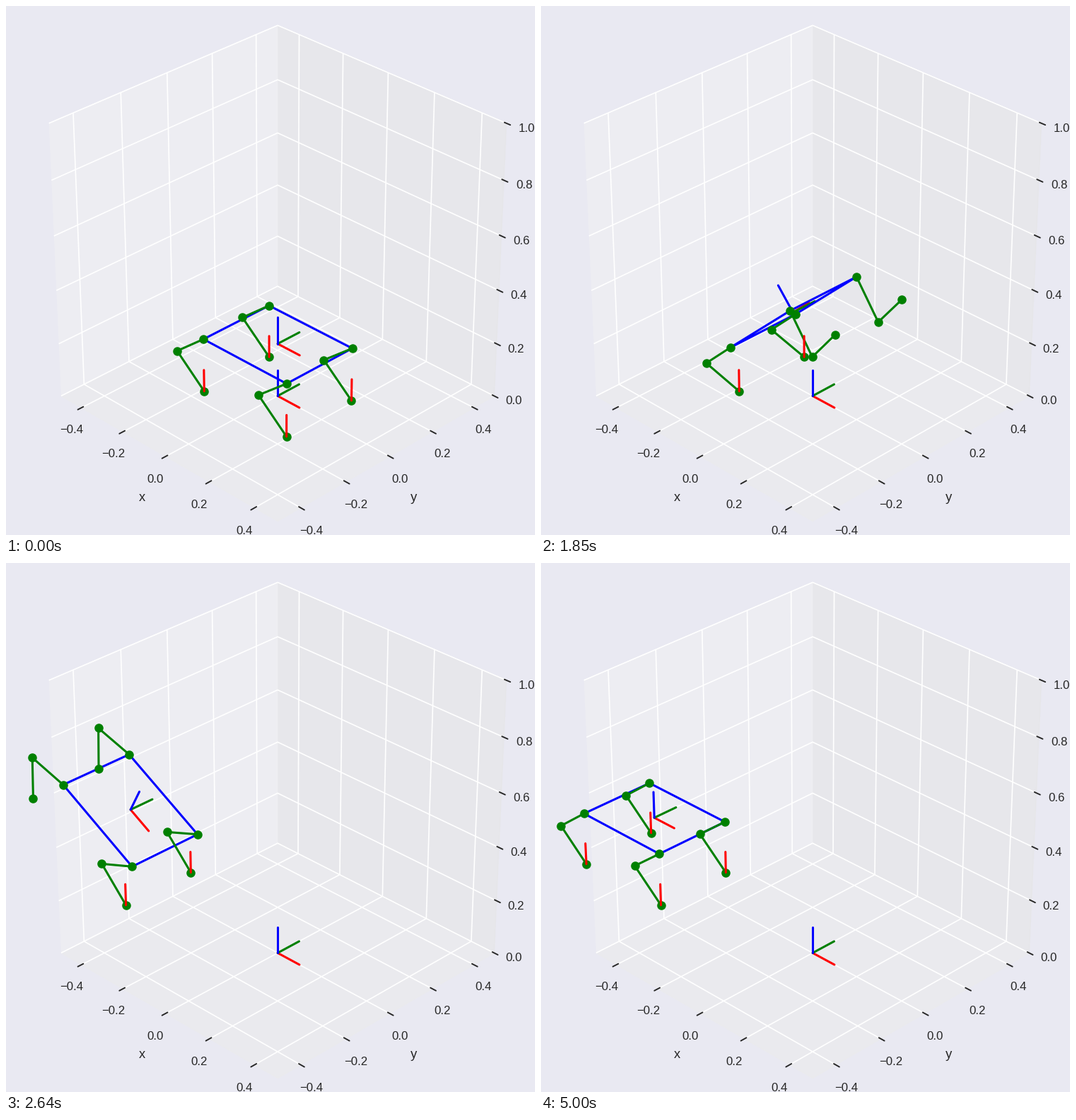
Recreate the animation shown at these times as a matplotlib script. Size 748 px wide and 748 px high, loop 5030 ms.

```python
import numpy as np
import matplotlib.pyplot as plt
from matplotlib.animation import FuncAnimation

INK = "#262626"
plt.rcParams.update({
    "font.family": "Liberation Sans",
    "figure.facecolor": "#E9E9F2", "axes.facecolor": "#E9E9F2",
    "text.color": INK, "axes.labelcolor": INK,
    "xtick.color": INK, "ytick.color": INK,
    "xtick.labelsize": 11, "ytick.labelsize": 11,
    "axes.labelsize": 12, "axes.labelpad": 6,
    "xtick.major.size": 6, "ytick.major.size": 6,
    "xtick.major.width": 1.25, "ytick.major.width": 1.25,
    "grid.color": "white", "grid.linewidth": 1.1, "grid.linestyle": "-",
    "lines.linewidth": 2, "lines.solid_capstyle": "round",
})

LOOP, FRAMES = 5030, 165
MID = 2203.5                      # the flip is symmetric in time about here
HALF_L, HALF_W = 0.19, 0.15       # hip offsets from the body centre
LINK, LEG, STAND = 0.1615, 0.2, 0.2
TRAVEL = 0.76
TOUCH, SETTLE = 0.2265, 0.70      # seconds from the middle of the flip
ARROW, AXIS = 0.082, 0.1


def smooth(a, b, v):
    u = np.clip((v - a) / (b - a), 0, 1)
    return u * u * (3 - 2 * u)


def hermite(knots, v):
    """Cubic through (time, value, slope) knots."""
    if v >= knots[-1][0]:
        return knots[-1][1]
    for (a, p, m), (b, q, n) in zip(knots, knots[1:]):
        if v <= b:
            d = b - a
            u = (v - a) / d
            return (p * (1 - 3*u*u + 2*u**3) + q * (3*u*u - 2*u**3)
                    + d * (m * u * (1 - u)**2 + n * u * u * (u - 1)))


def heading(deg):
    return np.array([np.cos(np.radians(deg)), np.sin(np.radians(deg))])


def body_pose(tau):
    """Centre (x, z) and pitch in degrees."""
    s = abs(tau)
    if s < TOUCH:
        swing, drift = 419 * s, 0.888 * s
        z = 0.5268 - 2.765 * s * s
    else:
        left = hermite([(TOUCH, 1, -4.94), (0.5265, 0.165, -1.6), (SETTLE, 0, 0)], s)
        swing = 180 - (180 - 419 * TOUCH) * left
        drift = TRAVEL / 2 - (TRAVEL / 2 - 0.888 * TOUCH) * left
        z = hermite([(TOUCH, 0.385, -1.2526), (0.5265, 0.232, -0.3),
                     (SETTLE, STAND, 0)], s)
    sign = np.sign(tau)
    return np.array([-TRAVEL / 2 - sign * drift, z]), 180 + sign * swing


def leg_pose(tau, centre, pitch, side):
    """Hip, knee and foot in the x-z plane; side is 1 for front, -1 for rear."""
    hip = centre + side * HALF_L * heading(pitch)
    tuck = 90 * (1 - smooth(0.13, 0.6, abs(tau)))
    free = hip + LEG * heading(pitch - 90 + side * tuck)
    # the front pair lands first, the rear pair pushes off last
    leads = side * tau > 0
    down = TOUCH if leads else 0.62
    lag = 0.05 if leads else 0.07
    home = np.array([side * HALF_L - (TRAVEL if tau > 0 else 0), 0])
    grip = smooth(down - lag, down, abs(tau))
    foot = free + (home - free) * grip
    reach = foot - hip
    bend = np.degrees(np.arccos(min(1, np.hypot(*reach) / (2 * LINK))))
    knee = hip + LINK * heading(np.degrees(np.arctan2(reach[1], reach[0])) - bend)
    return hip, knee, foot, abs(tau) >= down


def lift(points, y):
    pts = np.array(points)
    return pts[:, 0], np.full(len(pts), y), pts[:, 1]


fig = plt.figure(figsize=(6.8, 6.8), dpi=110)
ax = fig.add_axes([0, 0, 1, 1], projection="3d")
ax.view_init(elev=30, azim=-45)
ax.set_box_aspect((1, 1, 1))


def line(color, **kw):
    return ax.plot([], [], [], color=color, **kw)[0]


for end, color in zip(AXIS * np.eye(3), ("red", "green", "blue")):
    ax.plot(*([0, e] for e in end), color=color)

frame_lines = [line(c) for c in ("red", "green", "blue")]
trunk = line("blue")
PAIRS = [(side, y) for side in (1, -1) for y in (-HALF_W, HALF_W)]
legs = [line("green", marker="o", markersize=7.2) for _ in PAIRS]
arrows = [line("red") for _ in PAIRS]

ax.set(xlim=(-0.5, 0.5), ylim=(-0.5, 0.5), zlim=(0, 1), xlabel="x", ylabel="y")
ticks = [-0.4, -0.2, 0, 0.2, 0.4]
ax.set(xticks=ticks, yticks=ticks, zticks=np.linspace(0, 1, 6))
for axis in (ax.xaxis, ax.yaxis, ax.zaxis):
    axis.line.set_visible(False)


def update(i):
    # each frame shows the pose at the middle of its time slot
    tau = ((i + 0.5) * LOOP / FRAMES - MID) / 1000
    centre, pitch = body_pose(tau)

    ahead = centre + AXIS * heading(pitch)
    above = centre + AXIS * heading(pitch + 90)
    frame_lines[0].set_data_3d(*lift([centre, ahead], 0))
    frame_lines[1].set_data_3d([centre[0]] * 2, [0, AXIS], [centre[1]] * 2)
    frame_lines[2].set_data_3d(*lift([centre, above], 0))

    nose = centre + HALF_L * heading(pitch)
    tail = 2 * centre - nose
    ring = np.array([nose, nose, tail, tail, nose])
    trunk.set_data_3d(ring[:, 0], HALF_W * np.array([-1, 1, 1, -1, -1]), ring[:, 1])

    for (side, y), leg, arrow in zip(PAIRS, legs, arrows):
        hip, knee, foot, planted = leg_pose(tau, centre, pitch, side)
        leg.set_data_3d(*lift([hip, knee, foot], y))
        arrow.set_data_3d(*lift([foot, foot + [0, ARROW]], y))
        arrow.set_visible(bool(planted))
    return [*frame_lines, trunk, *legs, *arrows]


anim = FuncAnimation(fig, update, frames=FRAMES, interval=LOOP / FRAMES,
                     repeat=True, repeat_delay=0)
plt.show()
```
